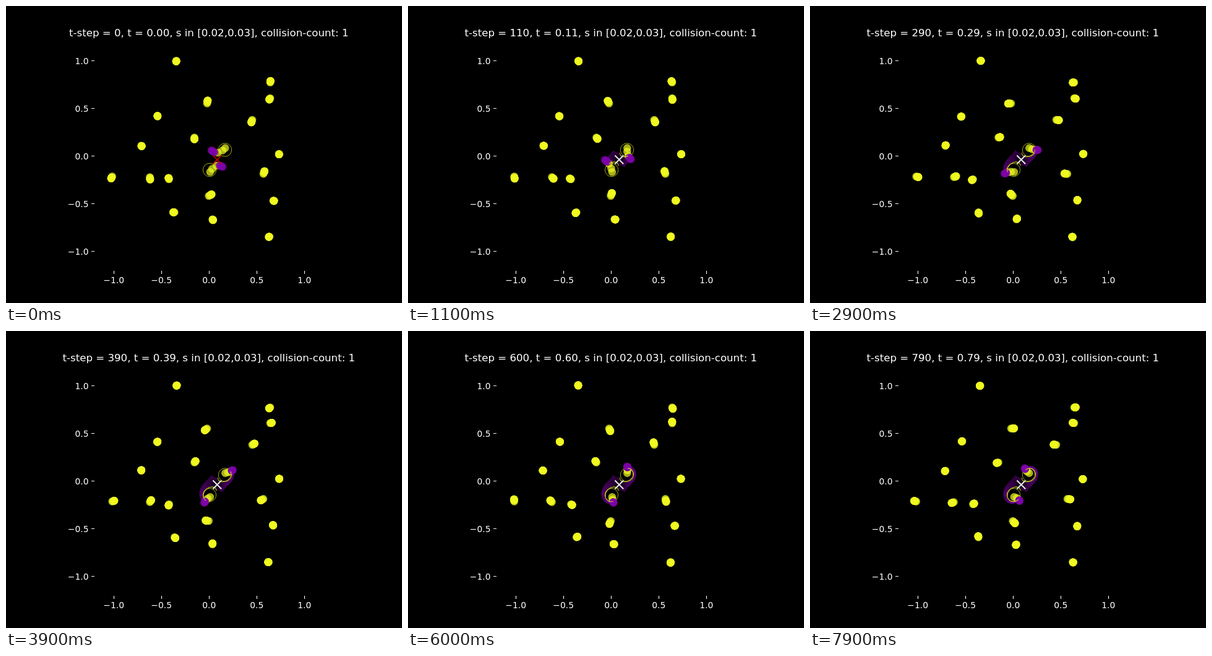
Write an HTML page with a canvas that moves like this. It is 640 px wide and 480 px high and loops after 8000 ms.

```html
<!DOCTYPE html>
<html lang="en">
<head>
<meta charset="utf-8">
<title>Eigenvalue paths</title>
<style>
  html, body { margin: 0; width: 100%; height: 100%; overflow: hidden; background: #000; }
  canvas, svg { position: absolute; left: 0; top: 0; width: 640px; height: 480px; }
  text { fill: #fff; font: 13.89px "DejaVu Sans", sans-serif; }
  #title { font-size: 16.64px; text-anchor: middle; }
</style>
</head>
<body>
<canvas id="plot" width="640" height="480"></canvas>
<svg id="axes" viewBox="0 0 640 480"><text id="title" x="327.8" y="49"></text></svg>
<script>
const ctx = document.getElementById('plot').getContext('2d');
const axes = document.getElementById('axes');
const title = document.getElementById('title');
const YELLOW = '#f0f921', PURPLE = '#7e03a8';
const STEP = 100, STEPS = 80, DOT = 6.3;
const CROSS = { x: 341.3, y: 248.4, step: 3 };

// Key points: centre x, y, orbit radius, start angle in degrees
const POINTS = [
  [275.3, 88.5, 1, -105], [427, 123.5, 2.5, 80], [427, 149, 2.7, 237],
  [325, 157.5, 5, 78], [398, 184, 4.5, 250], [245, 178.5, 1, 100],
  [304.5, 212.5, 3, -90], [218.7, 225.7, 1, -55], [441.3, 239.2, 0.6, -90],
  [171.7, 275.5, 3.7, 240], [232.5, 276.5, 4, -83], [263.5, 280, 2.3, 110],
  [416, 271.4, 5, 68], [327.7, 307, 5.4, 30], [432, 314.6, 1.3, -20],
  [272.3, 333.4, 2, 180], [333.7, 344.7, 1.6, -55], [424.6, 373.5, 1, 40]
];

const polar = (r, deg) => [r * Math.cos(deg * Math.PI / 180), r * Math.sin(deg * Math.PI / 180)];
const sum = (...v) => [v.reduce((s, p) => s + p[0], 0), v.reduce((s, p) => s + p[1], 0)];
const dist = (a, b) => Math.hypot(a[0] - b[0], a[1] - b[1]);

function single([x, y, r, start], rho, deg) {
  const [dx, dy] = polar(r * rho, start + deg);
  return [x + dx, y - dy];
}

// The colliding pair: mean plus and minus the square root of a quadratic
function pair(rho, deg) {
  const q = rho * rho;
  const m = sum(polar(1.97 * rho, 140 + deg), polar(1.16 * q, 66 + 2 * deg));
  const d = sum(polar(521, 115.4), polar(660 * rho, deg - 66.8), polar(170 * q, 218 + 2 * deg));
  const h = polar(Math.sqrt(Math.hypot(...d)), Math.atan2(d[1], d[0]) * 90 / Math.PI);
  const x = 342.1 + m[0], y = 248.9 - m[1];
  return [[x + h[0], y - h[1]], [x - h[0], y + h[1]]];
}

function dot([x, y], color) {
  ctx.globalAlpha = 0.7;
  ctx.fillStyle = color;
  ctx.beginPath();
  ctx.arc(x, y, DOT, 0, 2 * Math.PI);
  ctx.fill();
}

function line(path, color, width, alpha) {
  ctx.globalAlpha = alpha;
  ctx.strokeStyle = color;
  ctx.lineWidth = width;
  ctx.stroke(path);
}

// Both branches of one radius, followed continuously from angle 0
function trace(rho, end) {
  const path = new Path2D();
  let last = pair(rho, 0);
  for (let deg = 1.2; deg <= end; deg += 1.2) {
    const next = pair(rho, deg);
    if (dist(next[0], last[0]) > dist(next[1], last[0])) next.reverse();
    next.forEach((p, i) => {
      if (deg === 1.2) path.moveTo(...last[i]);
      else path.moveTo(...last[i]);
      path.lineTo(...p);
    });
    last = next;
  }
  return path;
}

function rings() {
  const path = new Path2D();
  for (const [x, y] of [[354, 232.5], [329, 265]]) {
    path.moveTo(x + 10.7, y);
    path.arc(x, y, 10.7, 0, 2 * Math.PI);
  }
  return path;
}

function cross(step) {
  const { x, y } = CROSS, r = 6.9, hit = step >= CROSS.step;
  const path = new Path2D(`M${x - r} ${y - r}L${x + r} ${y + r}M${x - r} ${y + r}L${x + r} ${y - r}`);
  line(path, hit ? '#e4e4e4' : '#d80000', hit ? 2.1 : 1.6, 1);
}

function draw(step) {
  const deg = step * 3.6;
  ctx.clearRect(0, 0, 640, 480);
  for (let rho = 0.69; rho < 1.005; rho += 0.01) line(trace(rho, deg), PURPLE, 1.2, 0.15);
  line(rings(), YELLOW, 1, 0.65);

  for (let k = 0; k <= 9; k++) {
    const rho = k < 2 ? k / 3 : (k + 12) / 21;
    for (const p of POINTS) dot(single(p, rho, deg), YELLOW);
    if (k < 3) pair(rho, deg).forEach(p => dot(p, YELLOW));
    else if (rho > 0.8) pair(rho, deg).forEach(p => dot(p, PURPLE));
  }
  line(trace(2 / 3, deg), YELLOW, 1.1, 0.85);
  cross(step);
  title.textContent = `t-step = ${step * 10}, t = ${(step / 100).toFixed(2)}, s in [0.02,0.03], collision-count: 1`;
}

function add(tag, attrs, text = '') {
  const el = document.createElementNS('http://www.w3.org/2000/svg', tag);
  for (const k in attrs) el.setAttribute(k, attrs[k]);
  el.textContent = text;
  axes.append(el);
}

for (let i = -2; i <= 2; i++) {
  const label = (i < 0 ? '\u2212' : '') + Math.abs(i / 2).toFixed(1);
  const x = 328.5 + 77 * i, y = 242.5 - 77 * i;
  add('path', { d: `M${x} 428v5M138 ${y}h5`, stroke: '#fff', 'stroke-width': 1.1 });
  add('text', { x: x - 0.3, y: 448, 'text-anchor': 'middle' }, label);
  add('text', { x: 133.5, y: y + 5.2, 'text-anchor': 'end' }, label);
}

const start = performance.now();
let shown = -1;
function tick() {
  const step = Math.floor((performance.now() - start) / STEP) % STEPS;
  if (step !== shown) draw(shown = step);
  requestAnimationFrame(tick);
}
tick();
</script>
</body>
</html>
```
